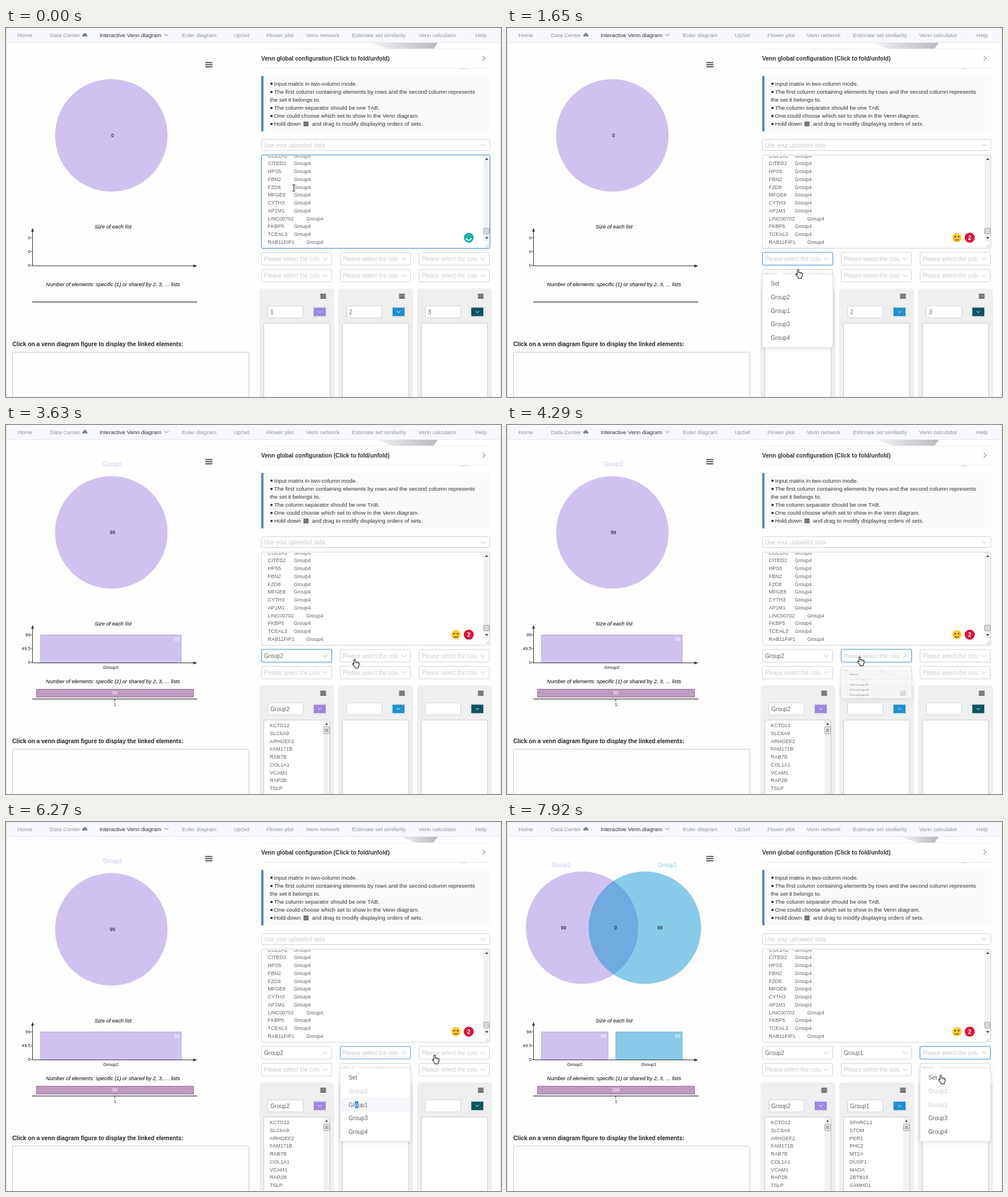
An HTML page with a canvas that plays this animation: 867x646 px, repeating every 8 s.

```html
<!DOCTYPE html>
<html lang="en">
<head>
<meta charset="utf-8">
<title>Interactive Venn diagram</title>
<style>
  html, body { margin: 0; width: 100%; height: 100%; overflow: hidden; background: #fefefe; }
  canvas { display: block; }
</style>
</head>
<body>
<canvas id="stage" width="867" height="646"></canvas>
<script>
const ctx = document.getElementById('stage').getContext('2d');
const FONT = '"Liberation Sans", Arial, sans-serif';
const LOOP = 8000, STEP = 330;
const PURPLE = '#cfc2f0', SKY = '#89cae8', BLUE = '#5a96d2', GRAY = '#606266', FAINT = '#c6cad2', LINE = '#cdd1d8';

const COLUMNS = [447, 585, 723];
const COLORS = ['#9f86e0', '#1e90cf', '#0d5560'];
const OPTIONS = ['Set', 'Group2', 'Group1', 'Group3', 'Group4'];
const TABLE = ['COL1A1', 'CITED2', 'HPS5', 'FBN2', 'FZD8', 'MFGE8', 'CYTH3', 'AP1M1', 'LINC00702', 'FKBP5', 'TCEAL3', 'RAB11FIP1'];
const SETS = [
  { name: 'Group2', color: PURPLE, genes: ['KCTD12', 'SLC6A9', 'ARHGEF2', 'FAM171B', 'RAB7B', 'COL1A1', 'VCAM1', 'RAP2B', 'TSLP'] },
  { name: 'Group1', color: SKY, genes: ['SPARCL1', 'STOM', 'PER1', 'PHC2', 'MT2A', 'DUSP1', 'MAOA', 'ZBTB16', 'SAMHD1'] }
];
const NAV = [['Home', 20], ['Data Center', 77], ['Interactive Venn diagram', 164], ['Euler diagram', 308], ['UpSet', 399],
  ['Flower plot', 456], ['Venn network', 525], ['Estimate set similarity', 606], ['Venn calculator', 722], ['Help', 822]];

// Pointer position (top left of the hand) at each step.
const POINTER = [[499, 274], [493, 417], [499, 402], [499, 402], [503, 416], [505, 422], [468, 476], [486, 477], [486, 477],
  [585, 435], [606, 409], [606, 409], [606, 409], [613, 405], [614, 430], [609, 494], [608, 496], [690, 462], [722, 412],
  [746, 407], [746, 407], [746, 407], [746, 407], [748, 414], [755, 442]];
const HAND = new Path2D('M3.5 9.5V1.8Q4.7 .2 6 1.8V6Q7.3 5 8.3 6.3Q9.5 5.5 10.5 7Q12 6.3 12.5 8V11.5L11 14V16.5H5V14.5L1 10Q.6 8 2 8.3Z');

const between = (n, low, high) => n >= low && n <= high;

function text(str, x, y, size, color = '#303133', align = 'left', style = '') {
  ctx.font = `${style} ${size}px ${FONT}`;
  ctx.textAlign = align;
  ctx.fillStyle = color;
  ctx.fillText(str, x, y + size * .36);
}

function rect(x, y, w, h, fill, stroke, radius = 0) {
  ctx.beginPath();
  ctx.roundRect(x, y, w, h, radius);
  if (fill) { ctx.fillStyle = fill; ctx.fill(); }
  if (stroke) { ctx.strokeStyle = stroke; ctx.lineWidth = 1; ctx.stroke(); }
}

function disc(x, y, r, fill) {
  ctx.beginPath();
  ctx.arc(x, y, r, 0, 7);
  ctx.fillStyle = fill;
  ctx.fill();
}

function path(points, stroke, width = 1) {
  ctx.beginPath();
  points.forEach(([x, y]) => ctx.lineTo(x, y));
  ctx.strokeStyle = stroke;
  ctx.lineWidth = width;
  ctx.stroke();
}

function polygon(points, fill) {
  ctx.beginPath();
  points.forEach(([x, y]) => ctx.lineTo(x, y));
  ctx.fillStyle = fill;
  ctx.fill();
}

function clipped(x, y, w, h, draw) {
  ctx.save();
  ctx.beginPath();
  ctx.rect(x, y, w, h);
  ctx.clip();
  draw();
  ctx.restore();
}

function chevron(x, y, color, size = 4, angle = 0) {
  ctx.save();
  ctx.translate(x, y);
  ctx.rotate(angle);
  path([[-size, -size / 2], [0, size / 2], [size, -size / 2]], color);
  ctx.restore();
}

function bars(x, y, w, count, gap, height, color) {
  for (let i = 0; i < count; i++) rect(x, y + i * gap, w, height, color);
}

// Bordered field with an optional focus ring (1: border only, 2: border and glow).
function field(x, y, w, h, focus = 0) {
  if (focus === 2) rect(x - 1.5, y - 1.5, w + 3, h + 3, '#d3e6fa', null, 4);
  rect(x, y, w, h, '#fff', focus ? BLUE : LINE, 2);
}

function drawHeader(step) {
  rect(0, 0, 867, 25, '#f6f8fc');
  rect(0, 25, 867, 1, '#e4e7ee');
  NAV.forEach(([label, x], i) => text(label, x, 12, 9.75, i === 2 ? '#303133' : '#909399'));
  disc(135.8, 13, 2.3, '#7d828b');
  disc(138.3, 11.5, 2.7, '#7d828b');
  disc(140.6, 13.2, 2, '#7d828b');
  chevron(281, 12, '#707680', 3.5);

  const left = 640 + (step > 5 ? 8 : 0) + 42 * Math.min(1, Math.max(0, (step - 13) / 5));
  const shade = ctx.createLinearGradient(left, 0, 754, 0);
  shade.addColorStop(0, '#f4f4f6');
  shade.addColorStop(.5, '#d6d6da');
  shade.addColorStop(1, '#b9b9be');
  polygon([[left, 26], [756, 26], [749, 36], [left + 28, 36]], shade);

  rect(447, 36, 401, 1, '#eceef3');
  rect(447, 70, 401, 1, '#e9ebf0');
  rect(795, 71, 10, 1, '#d2d3d6');
  text('Venn global configuration (Click to fold/unfold)', 447, 53, 10.1, '#303133', 'left', 'bold');
  chevron(837, 53, '#50545a', 4, -Math.PI / 2);
}

function drawHelp() {
  rect(447, 84, 401, 97, '#f9fafc');
  rect(447, 84, 4, 97, '#5b86bd');
  const lines = [
    [97, 'Input matrix in two-column mode.'],
    [111.5, 'The first column containing elements by rows and the second column represents'],
    [139.5, 'The column separator should be one TAB.'],
    [153.5, 'One could choose which set to show in the Venn diagram.'],
    [167.5, 'Hold down']
  ];
  for (const [y, line] of lines) {
    disc(465, y + .5, 2.1, '#303133');
    text(line, 469.5, y, 9.88);
  }
  text('the set it belongs to.', 462, 125.5, 9.88);
  rect(518.5, 161.5, 14, 13, '#fff', '#eef0f4', 2);
  bars(521, 164, 9, 4, 2.2, 1.3, '#222');
  text('and drag to modify displaying orders of sets.', 536, 167.5, 9.88);
}

function drawChecker(step) {
  if (step < 3) {
    disc(810.5, 367, 8.7, '#1fb3ae');
    ctx.beginPath();
    ctx.arc(810.5, 367, 4.6, .2 + step * 2, 2.9 + step * 2);
    ctx.strokeStyle = '#fff';
    ctx.lineWidth = 1.6;
    ctx.stroke();
    return;
  }
  disc(788, 367, 8, '#fcc928');
  disc(785, 365.3, 1.4, '#5f4318');
  disc(791, 365.3, 1.4, '#5f4318');
  path([[784, 371], [792, 371]], '#5f4318', 1.3);
  disc(810.5, 367, 8.8, '#df1238');
  text('2', 810.5, 367, 10.5, '#fff', 'center', 'bold');
}

function drawTable(step) {
  field(447.5, 195.5, 400, 19);
  text('Use your uploaded data', 452, 205, 10.05, FAINT);
  chevron(836, 205, '#b8bcc5');

  field(447.5, 222.5, 400, 163, step < 3 ? 2 : 0);
  clipped(449, 224, 380, 160, () => TABLE.forEach((gene, i) => {
    const y = 223.5 + i * 13.74;
    text(gene, 458.5, y, 9, GRAY);
    text('Group4', gene.length > 8 ? 526 : 504, y, 8.9, GRAY);
  }));
  rect(836, 223, 11, 151, '#f2f2f3');
  rect(836.5, 350.5, 10, 10, '#d8d8da', '#a5a6aa', 1);
  polygon([[839, 231], [842, 227.5], [845, 231]], '#4c4e52');
  polygon([[839, 366], [842, 369.5], [845, 366]], '#4c4e52');
  path([[840, 384], [846, 378]], '#b0b2b6');
  path([[843, 384], [846, 381]], '#b0b2b6');
  drawChecker(step);
}

function drawSelect(x, y, value, focus, open) {
  field(x + .5, y - 11, 123, 22, focus);
  clipped(x, y - 11, 102, 22, () => text(value || 'Please select the column', x + 5, y, 10.05, value ? GRAY : FAINT));
  chevron(x + 112, y, '#b8bcc5', 4, -Math.PI * open);
}

function drawColumn(i, set, initial) {
  const x = COLUMNS[i];
  rect(x - 3, 456, 131, 200, '#efefef', null, 5);
  bars(x + 103.5, 465.5, 10, 4, 2.3, 1.3, '#222');
  rect(x + 11.5, 486.5, 62, 21, '#fff', LINE, 2);
  text(set ? set.name : initial ? i + 1 : '', x + 16, 497, 10.05, GRAY);
  rect(x + 91, 488, 23, 18, '#f7f7f7', '#dcdfe4', 2);
  rect(x + 92, 489.5, 21, 15, COLORS[i]);
  chevron(x + 102.5, 497, '#fff', 3);
  rect(x + 4.5, 516.5, 116, 150, '#fff', '#c6cad0', 2);
  if (!set) return;
  set.genes.forEach((gene, n) => text(gene, x + 15, 526 + n * 13.75, 9, GRAY));
  rect(x + 109, 517, 11, 130, '#f2f2f3');
  polygon([[x + 112, 525], [x + 114.5, 521.5], [x + 117, 525]], '#4c4e52');
  rect(x + 109.5, 528.5, 10, 12, '#e4e4e6', '#a5a6aa', 1);
  bars(x + 112, 532, 5, 3, 2, 1, '#777a80');
}

function drawMenu(x, open, hover, taken, marked) {
  ctx.save();
  ctx.globalAlpha = open < .5 ? .75 : open;
  ctx.translate(0, 431);
  ctx.scale(1, open);
  ctx.translate(0, -431);
  ctx.shadowColor = 'rgba(0,0,0,.16)';
  ctx.shadowBlur = 7;
  ctx.shadowOffsetY = 1;
  rect(x + .5, 431, 123, 128, '#fff', null, 2);
  ctx.shadowColor = 'transparent';
  rect(x + .5, 431, 123, 128, null, '#e6e8ee', 2);
  polygon([[x + 24, 432], [x + 30, 426], [x + 36, 432]], '#fff');
  OPTIONS.forEach((label, i) => {
    const y = 447 + i * 23.95;
    if (i === hover) rect(x + 1, y - 12, 122, 24, '#f5f7fa');
    text(label, x + 15, y, 10.05, taken.includes(label) ? FAINT : GRAY);
  });
  if (marked) {
    rect(x + 26, 489, 6, 12, '#2d8ae0');
    text('o', x + 26.2, 494.9, 10.05, '#fff');
  }
  ctx.restore();
}

function drawVenn(sets) {
  bars(349, 59.5, 12.5, 3, 3.7, 2, '#555');
  if (sets.length < 2) {
    disc(184.5, 188, 98.5, PURPLE);
    if (sets.length) text('Group2', 186.5, 68, 10, PURPLE, 'center');
    text(sets.length ? '99' : '0', 186.5, 188, 8.4, '#000', 'center');
    return;
  }
  disc(131.5, 185, 98.5, PURPLE);
  disc(241.5, 185, 98.5, SKY);
  ctx.save();
  ctx.beginPath();
  ctx.arc(131.5, 185, 98.5, 0, 7);
  ctx.clip();
  disc(241.5, 185, 98.5, '#70aae1');
  ctx.restore();
  text('Group2', 95, 75, 10, PURPLE, 'center');
  text('Group1', 281, 75, 10, SKY, 'center');
  [['99', 99], ['0', 190], ['99', 268]].forEach(([n, x]) => text(n, x, 184.5, 8.4, '#000', 'center'));
}

function drawCharts(sets) {
  const count = sets.length;
  text('Size of each list', 187.5, 348, 9.25, '#000', 'center', 'italic');
  const width = count > 1 ? 117 : 247;
  sets.forEach(({ name, color }, i) => {
    const x = 60 + i * 130;
    rect(x + .5, 367.5, width - .5, 49, color, i ? '#78b4d2' : '#b7abd8');
    text('99', x + width - 3.5, 375, 8.2, '#fff', 'right');
    text(name, x + width / 2, 424.5, 8, '#111', 'center');
  });
  path([[46.5, 355], [46.5, 416.5], [330, 416.5]], '#333');
  polygon([[44, 356.5], [46.5, 350], [49, 356.5]], '#333');
  polygon([[328, 414], [335, 416.5], [328, 419]], '#333');
  (count ? ['99', '49.5', '0'] : ['0', '0', '0']).forEach((label, i) => {
    const y = 367.5 + i * 24;
    path([[44, y], [46, y]], '#333');
    text(label, 43, y, 8, '#111', 'right');
  });

  text('Number of elements: specific (1) or shared by 2, 3, … lists', 187.5, 448.5, 9.15, '#000', 'center', 'italic');
  path([[46, 479.7], [335, 479.7]], '#333', 1.2);
  if (count) {
    rect(53.5, 462.5, 275, 14, '#bf9bbf', '#917191');
    text(99 * count, 190.5, 469.5, 8.2, '#fff', 'center');
    path([[190.5, 480], [190.5, 484]], '#333');
    text('1', 191, 489.5, 8, '#111', 'center');
  }
  text('Click on a venn diagram figure to display the linked elements:', 11, 553, 10.2, '#222', 'left', 'bold');
  rect(11.5, 567.5, 414, 100, '#fefefe', '#c6cad0', 2);
}

function drawPointer(step) {
  const [x, y] = POINTER[step];
  if (step === 0) {
    path([[504, 275], [504, 285]], '#222');
    path([[501.5, 274.5], [506.5, 274.5]], '#222');
    path([[501.5, 285.5], [506.5, 285.5]], '#222');
    return;
  }
  ctx.save();
  ctx.translate(x, y);
  ctx.fillStyle = '#fff';
  ctx.strokeStyle = '#222';
  ctx.lineWidth = 1.1;
  ctx.fill(HAND);
  ctx.stroke(HAND);
  path([[8.3, 6.5], [8.3, 9]], '#444', .8);
  path([[10.5, 7], [10.5, 9.5]], '#444', .8);
  ctx.restore();
}

function draw(step) {
  const sets = SETS.slice(0, step >= 20 ? 2 : step >= 11 ? 1 : 0);
  const active = step < 3 ? -1 : step < 13 ? 0 : step < 22 ? 1 : 2;
  const picked = between(step, 8, 10) || between(step, 17, 19);
  const opening = { 4: .87, 13: .37, 23: .97 };
  const isOpen = between(step, 5, 10) || between(step, 14, 19) || step === 24;
  const open = opening[step] || (isOpen ? 1 : 0);

  rect(0, 0, 867, 646, '#fefefe');
  drawHeader(step);
  rect(0, 0, 1, 646, '#cfd6e2');
  rect(866, 0, 1, 646, '#dde1e8');
  drawVenn(sets);
  drawCharts(sets);
  drawHelp();
  drawTable(step);
  COLUMNS.forEach((x, i) => {
    drawSelect(x, 404, sets[i]?.name, i === active ? (picked ? 1 : 2) : 0, i === active ? open : 0);
    drawSelect(x, 433.5, '', 0, 0);
    drawColumn(i, sets[i], step < 11);
  });
  if (open) {
    const hover = between(step, 6, 10) ? 1 : between(step, 15, 19) ? 2 : -1;
    drawMenu(COLUMNS[active], open, hover, sets.map(set => set.name), between(step, 17, 19));
  }
  drawPointer(step);
}

function tick() {
  draw(Math.floor(performance.now() % LOOP / STEP));
  requestAnimationFrame(tick);
}
tick();
</script>
</body>
</html>
```
